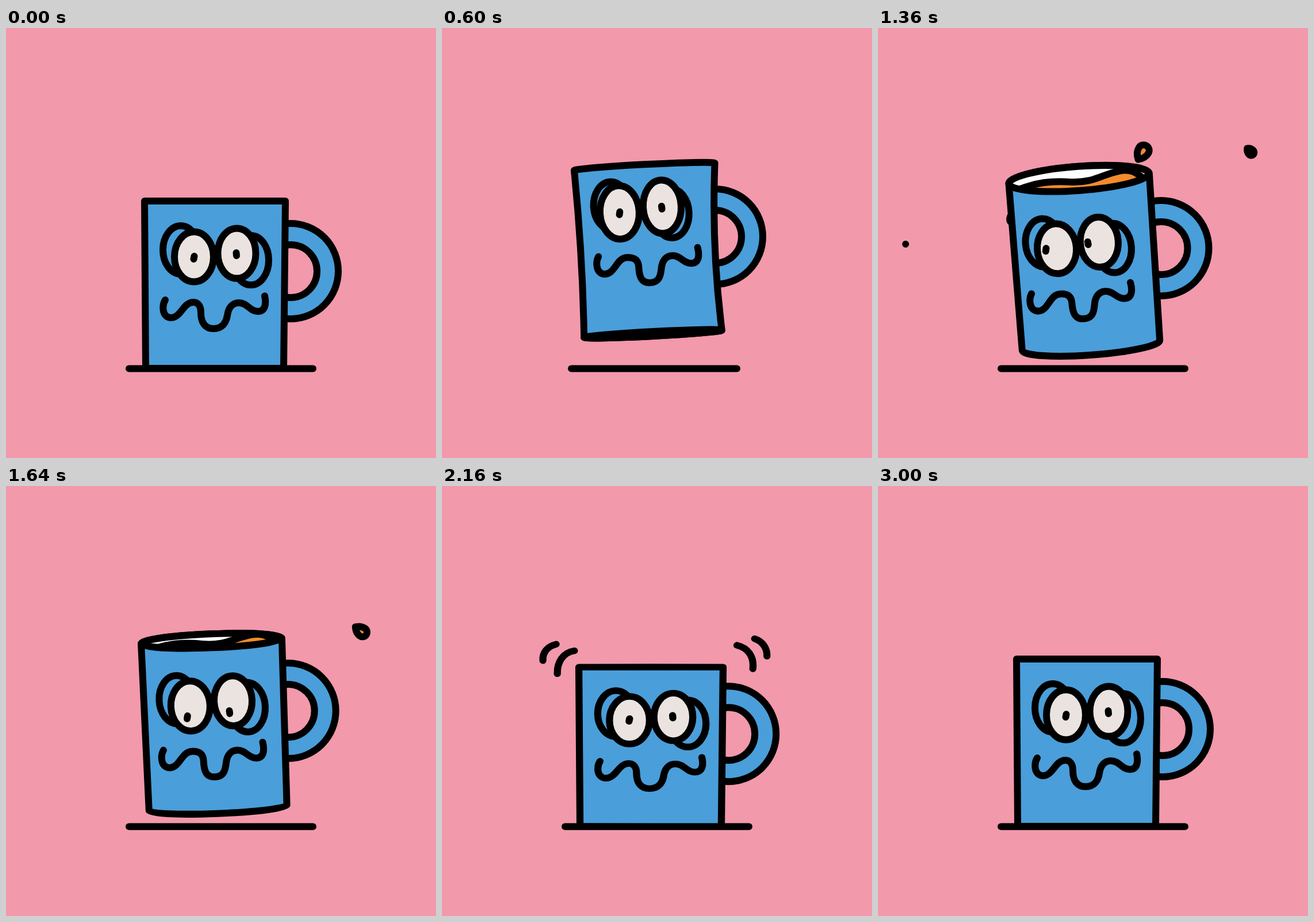
An HTML page that plays this animation: 748 by 748 pixels, repeating every 3.04 s.

```html
<!DOCTYPE html>
<html lang="en">
<head>
<meta charset="utf-8">
<title>Jittery mug</title>
<style>
  html, body { margin: 0; width: 100%; height: 100%; overflow: hidden; background: #f299ab; }
  svg { display: block; width: 100vw; height: 100vh; }
  .ink { fill: none; stroke: #000; stroke-width: 12; stroke-linecap: round; stroke-linejoin: round; }
  .blue { fill: #4a9eda; }
  .pale { fill: #ebe3e0; }
  .coffee { fill: #f38b2c; }
  .white { fill: #fff; }
</style>
</head>
<body>
<svg viewBox="0 0 748 748">
  <defs><clipPath id="rimClip"><ellipse id="rimClipShape" cy="-291" rx="122"/></clipPath></defs>
  <path id="ground" class="ink"/>
  <g id="drops">
    <path id="blob" class="ink coffee" d="M-56 5C-57 -24 -34 -40 -4 -39C28 -38 53 -17 59 -1C62 13 38 13 16 22C-3 30 -12 37 -27 37C-45 36 -56 23 -56 5Z"/>
  </g>
  <g id="handle">
    <circle r="64.5" fill="none" stroke="#000" stroke-width="49"/>
    <circle r="64.5" fill="none" stroke="#4a9eda" stroke-width="25"/>
  </g>
  <g id="mug">
    <path id="body" class="ink blue"/>
    <ellipse id="base" class="ink pale" rx="120"/>
    <g id="opening">
      <ellipse id="rimFill" class="white" cy="-291" rx="122"/>
      <g clip-path="url(#rimClip)">
        <path id="liquid" class="ink coffee" d="M-112 14C-75 0 -45 1 -15 5C25 10 40 -4 72 -8C95 -11 105 1 116 12V50H-112Z"/>
      </g>
      <ellipse id="rim" class="ink" cy="-291" rx="122"/>
    </g>
    <g transform="translate(-363 -592)">
      <ellipse id="backL" class="ink blue" cx="304" cy="386" rx="31" ry="42"/>
      <ellipse id="backR" class="ink blue" cx="426" cy="404" rx="31" ry="43"/>
      <g id="eyes">
        <ellipse class="ink pale eye" cx="327" cy="398" rx="34"/>
        <ellipse class="ink pale eye" cx="401.5" cy="392" rx="33"/>
        <path id="pupils" class="ink" d="M327.5 397L326.5 402M400.5 391L401 396"/>
      </g>
      <path id="mouth" class="ink"/>
    </g>
    <g id="linesL">
      <path class="ink" d="M-129.5 -321C-149 -318 -159 -300 -158.5 -279" pathLength="1"/>
      <path class="ink" d="M-160.5 -333C-176 -329 -184 -317 -183 -303" pathLength="1"/>
    </g>
    <g id="linesR">
      <path class="ink" d="M146.5 -331C165 -326 176 -311 173.5 -288" pathLength="1"/>
      <path class="ink" d="M176.5 -343C190 -338 198 -326 197.5 -311" pathLength="1"/>
    </g>
  </g>
</svg>
<script>
const LOOP = 3040, STEP = 40;
const $ = id => document.getElementById(id);
const set = (el, attrs) => { for (const k in attrs) el.setAttribute(k, attrs[k]); };
const move = (id, x, y) => set($(id), { transform: `translate(${x} ${y})` });
const show = (el, on) => { el.style.display = on ? '' : 'none'; };

const clamp = u => Math.min(1, Math.max(0, u));
const ramp = (t, from, to) => {
  const u = clamp((t - from) / (to - from));
  return u * u * (3 - 2 * u);
};
const pulse = (t, center, width) => Math.exp(-(((t - center) / width) ** 2));
const mix = (a, b, u) => a + (b - a) * u;

// view is the depth of the rim: below zero seen from underneath, above zero from the top
const rest = { x: 363, y: 592, tilt: 0, view: 0, faceX: 0, faceY: 0 };
const poses = [
  { t: 0, ...rest },
  { t: 360, ...rest },
  { t: 600, x: 367, y: 532, tilt: -3, view: -4, faceX: -11, faceY: -20 },
  { t: 1000, x: 384, y: 544.5, tilt: -2.5, view: -7, faceX: -12, faceY: -2 },
  { t: 1360, x: 370.5, y: 552, tilt: -4.2, view: 21, faceX: -11, faceY: 22 },
  { t: 1960, x: 366.5, y: 570, tilt: 0, view: 1, faceX: 3, faceY: 6 },
  { t: 2100, ...rest },
  { t: LOOP, ...rest }
];

function poseAt(t) {
  const i = poses.findIndex(p => p.t > t), a = poses[i - 1], b = poses[i];
  const u = ramp(t, a.t, b.t), pose = {};
  for (const k in rest) pose[k] = mix(a[k], b[k], u);
  return pose;
}

const drops = [
  { start: 740, end: 1400, from: [262, 250], via: [99, 132], to: [48, 376], r: 18, ease: 3 },
  { start: 760, end: 1440, from: [425, 270], via: [458, -18], to: [704, 278], r: 11, ease: 1 },
  { start: 1240, end: 1740, from: [452, 285], via: [437, 79], to: [722, 340], r: 10, ease: 1 },
  { start: 1240, end: 1460, from: [250, 285], via: [220, 330], to: [250, 372], r: 6, ease: 1 }
];
for (const drop of drops) {
  drop.el = document.createElementNS('http://www.w3.org/2000/svg', 'path');
  drop.el.setAttribute('class', 'ink coffee');
  $('drops').append(drop.el);
}

// Teardrop with its tip trailing to the left
function dropPath(r) {
  if (r < 2) return 'M0 0h.01';
  return `M${-1.9 * r} 0C${-1.4 * r} ${-.6 * r} ${-.8 * r} ${-r} 0 ${-r}`
    + `A${r} ${r} 0 0 1 0 ${r}C${-.8 * r} ${r} ${-1.4 * r} ${.6 * r} ${-1.9 * r} 0Z`;
}

function drawDrop({ el, start, end, from, via, to, r, ease }, t) {
  show(el, t >= start && t < end);
  const u = 1 - (1 - clamp((t - start) / (end - start))) ** ease;
  const a = [0, 1].map(i => mix(from[i], via[i], u));
  const b = [0, 1].map(i => mix(via[i], to[i], u));
  const heading = Math.atan2(b[1] - a[1], b[0] - a[0]) * 180 / Math.PI;
  set(el, {
    d: dropPath(r * Math.min(1, 4 * u, 4 * (1 - u))),
    transform: `translate(${mix(a[0], b[0], u)} ${mix(a[1], b[1], u)}) rotate(${heading})`
  });
}

function drawBlob(t) {
  const size = Math.max(.1, ramp(t, 700, 840)), el = $('blob');
  show(el, t > 720 && t < 1100);
  set(el, { transform: `translate(328 ${145 + (t - 900) ** 2 / 290}) scale(${size})` });
  el.style.strokeWidth = 12 / size;
}

function drawMug(t, { x, y, tilt, view }, air, bend) {
  const squash = .07 * pulse(t, 280, 90) + .05 * pulse(t, 2150, 60);
  const sx = 1 + squash / 2, sy = 1 - squash;
  set($('mug'), { transform: `translate(${x} ${y}) rotate(${tilt}) scale(${sx} ${sy})` });
  move('handle', x + (132 - 10 * air - 14 * bend) * sx, y - 169 * sy);

  const depth = Math.max(.1, Math.abs(view));
  const baseDepth = view > 0 ? .8 * depth : depth;
  set($('body'), { d: `M-122 -291A122 ${depth} 0 0 1 123 -291Q${121.5 - 12 * bend} -145 120 0`
    + `A120 ${baseDepth} 0 0 1 -120 0Q${-121 + 6 * bend} -145 -122 -291Z` });
  show($('base'), view < -.5);
  set($('base'), { ry: depth });
  show($('opening'), view > 1.5);
  for (const id of ['rim', 'rimFill', 'rimClipShape']) set($(id), { ry: depth });
  set($('liquid'), { transform: 'translate(0 -291)' });
}

function drawFace(t, { faceX, faceY }, air, bend) {
  const squeeze = 12 * pulse(t, 760, 320) * air;
  move('eyes', faceX, faceY);
  for (const eye of document.querySelectorAll('.eye')) set(eye, { ry: 43.5 + 3 * bend });
  move('backL', faceX + squeeze, faceY);
  move('backR', faceX - squeeze, faceY);
  move('mouth', faceX + squeeze, faceY);

  // Pupils roll around, speeding up on the way
  const turn = (t - 1000) / 360, angle = (239 - 34 * turn - 22 * turn ** 2) * Math.PI / 180;
  const reach = 19 * ramp(t, 640, 900) * (1 - ramp(t, 2000, 2200));
  move('pupils', reach * Math.cos(angle), reach * Math.sin(angle));

  const wall = 7 * air, dip = wall / 2;
  set($('mouth'), { d: `M277 473C272 481 270 502 286 504C304 505 308 477 326 477`
    + `C${334 + wall} 477 ${339 + wall} 484 ${339 + wall} 495C${339 + wall} 512 ${346 + dip} 523 ${361 + dip} 523`
    + `C${376 + dip} 523 383 513 385 500C387 486 394 478 405 478C420 478 424 493 438 493C451 493 453 480 450 466` });
}

const bursts = [[160, 400], [760, 1160], [1840, 2320]];
function drawLines(t) {
  const shown = delay => Math.max(...bursts.map(([on, off]) =>
    ramp(t, on + delay, on + delay + 80) * (1 - ramp(t, off, off + 80))));
  const trim = (el, amount) => {
    show(el, amount > .02);
    set(el, { 'stroke-dasharray': `${amount} 2` });
  };
  [...$('linesL').children].forEach((el, i) => trim(el, shown(160 * i)));
  [...$('linesR').children].forEach(el => trim(el, shown(0)));
  const drift = ramp(t, 2160, 2360);
  move('linesL', -26 * drift, 0);
  move('linesR', 4 * drift, -9 * drift);
}

function render(t) {
  const pose = poseAt(t);
  const air = ramp(t, 380, 560) * (1 - ramp(t, 1960, 2100));
  const bend = pulse(t, 600, 90);
  drawMug(t, pose, air, bend);
  drawFace(t, pose, air, bend);
  drawLines(t);
  drawBlob(t);
  for (const drop of drops) drawDrop(drop, t);
  set($('ground'), { d: `M${214 + 11 * bend} 592.5H${534 - 21 * bend}` });
}

const start = performance.now();
function frame() {
  const t = (performance.now() - start) % LOOP;
  render(Math.floor(t / STEP) * STEP);
  requestAnimationFrame(frame);
}
frame();
</script>
</body>
</html>
```
